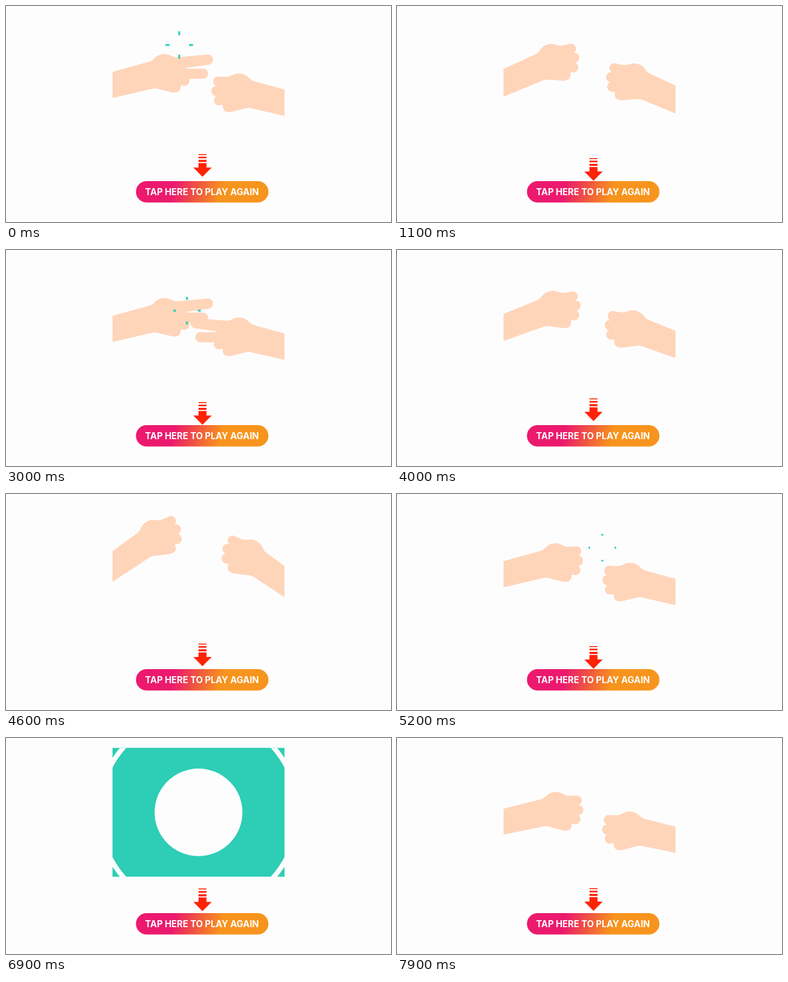
Recreate the animation shown at these times as an HTML page. Size 600 px wide and 338 px high, loop 8 s.

```html
<!DOCTYPE html>
<html lang="en">
<head>
<meta charset="utf-8">
<title>Hand game</title>
<style>
  html, body { margin: 0; width: 100%; height: 100%; overflow: hidden; background: #fefdfe; }
  svg { display: block; width: 100vw; height: 100vh; }
  text { font: 700 13.9px Inter, "Open Sans", sans-serif; fill: #fff; text-anchor: middle; }
  .hand { fill: #ffd5ba; }
  .teal { fill: #2dcdb6; }
  .paper { fill: #fefdfe; }
  #sparks { stroke: #2dcdb6; stroke-width: 3; fill: none; }
</style>
</head>
<body>
<svg viewBox="0 0 600 338">
  <defs>
    <clipPath id="stage"><rect x="166" y="15.5" width="268" height="201.5"/></clipPath>
    <linearGradient id="fire" gradientUnits="userSpaceOnUse" x1="262" y1="283" x2="334" y2="301">
      <stop offset="0" stop-color="#ec1a6e"/>
      <stop offset=".5" stop-color="#f0583f"/>
      <stop offset="1" stop-color="#f7941d"/>
    </linearGradient>
    <g id="palm">
      <path d="M90 126 L222 89.5 Q228 88 231 84 Q238 77 247 77 C255 77 258 82 267 82.5 L281 82 L282 104 L278 120 L265 137 Q261 138 256 136.5 L236 131.5 Q232 130.5 228 131.5 L90 163.500Z"/>
      <circle cx="278" cy="119" r="8"/>
      <circle cx="264.500" cy="129.500" r="7.700"/>
    </g>
    <g id="fist">
      <use href="#palm"/>
      <circle cx="279.500" cy="89.500" r="7.700"/>
      <circle cx="282" cy="104.500" r="8"/>
    </g>
    <g id="scissors">
      <use href="#palm"/>
      <path d="M258 83 L313 78 A8 8 0 0 1 316 94 L271 100 H307 A8 8 0 0 1 307 116 H262Z"/>
    </g>
  </defs>

  <g clip-path="url(#stage)">
    <g id="hands" class="hand">
      <use id="left" href="#fist"/>
      <g transform="translate(610 30.500) scale(-1 1)"><use id="right" href="#fist"/></g>
    </g>
    <path id="sparks"/>
    <g id="wipe"></g>
  </g>

  <g id="arrow" fill="#ff2306">
    <path d="M300-35.500h12.500v1.500h-12.500zM300-31.500h12.500v2.500h-12.500zM300-26.500h12.500v3.300h-12.500zM300-21.500h12.500v7h8L306.200 0 292-14.500h8z"/>
  </g>
  <rect x="202.500" y="274" width="206.500" height="33.500" rx="16.750" fill="url(#fire)"/>
  <text x="305.500" y="295.800">TAP HERE TO PLAY AGAIN</text>
</svg>
<script>
  const LOOP = 8000, ROUND = 2970;
  const $ = id => document.getElementById(id);

  // time, angle, dy, dx
  const pump = [
    [0, 0, -2, 0], [890, 0, -2, 0], [1110, -9.5, 0, 0], [1430, 0, 1, 0],
    [1670, -22, 0, 0], [1860, 0, 2, 0], [2040, -26, 0, 0], [2230, 0, 0, 0],
    [2400, 0, -2, 0], [ROUND, 0, -2, 0]
  ];
  const enter = [[7200, 20, 0, -140], [7560, -18, 0, 0], [7880, 1.3, 5, 0], [LOOP, 1, 4, 0]];

  // start, x, y
  const bursts = [
    [-200, 270, 61], [380, 377, 120], [2880, 282, 95],
    [3120, 400, 130], [5140, 320, 84], [5700, 250, 85]
  ];
  const BURST_LIFE = 500;

  // start and class of each growing disc
  const discs = [[6420, 'teal'], [6523, 'paper'], [6541, 'teal'], [6738, 'paper']];
  const GROWTH = 0.42;
  $('wipe').innerHTML = discs.map(d => `<circle class="${d[1]}" cx="300" cy="116.300"/>`).join('');
  const circles = [...$('wipe').children];

  function sample(keys, t) {
    let i = 1;
    while (i < keys.length - 1 && keys[i][0] < t) i++;
    const a = keys[i - 1], b = keys[i];
    const p = Math.min(1, Math.max(0, (t - a[0]) / (b[0] - a[0])));
    const k = p * p * (3 - 2 * p);
    return a.slice(1).map((v, n) => v + (b[n + 1] - v) * k);
  }

  function poseAt(t) {
    if (t >= 7200) return sample(enter, t);
    return sample(pump, t < 2 * ROUND ? t % ROUND : 0);
  }

  function sparkPath(t) {
    let d = '';
    for (const [start, x, y] of bursts) {
      const p = (t - start) / BURST_LIFE;
      if (p <= 0 || p >= 1) continue;
      const len = 6.5 * Math.sin(Math.PI * p), inner = 21.5 - len;
      d += `M${x} ${y - inner}v${-len}M${x} ${y + inner}v${len}`;
      d += `M${x - inner} ${y}h${-len}M${x + inner} ${y}h${len}`;
    }
    return d;
  }

  function draw(t) {
    const [angle, dy, dx] = poseAt(t);
    const move = `translate(${dx} ${dy}) rotate(${angle} 137 128)`;
    const second = t >= 2280 && t < 3560;
    const shapes = {
      left: t < 760 || second ? '#scissors' : '#fist',
      right: second ? '#scissors' : '#fist'
    };
    for (const side in shapes) {
      $(side).setAttribute('transform', move);
      $(side).setAttribute('href', shapes[side]);
    }
    $('hands').style.display = t > 6735 && t < 7200 ? 'none' : '';
    $('sparks').setAttribute('d', sparkPath(t));

    $('wipe').style.display = t < 7160 ? '' : 'none';
    discs.forEach(([start], i) => circles[i].setAttribute('r', Math.max(0, (t - start) * GROWTH)));

    const bob = 270.4 - 3.2 * Math.cos(2 * Math.PI * 0.47 * (t - 2050) / 1000);
    $('arrow').setAttribute('transform', `translate(0 ${bob})`);
  }

  const begin = performance.now();
  function tick() {
    draw((performance.now() - begin) % LOOP);
    requestAnimationFrame(tick);
  }
  tick();
</script>
</body>
</html>
```
